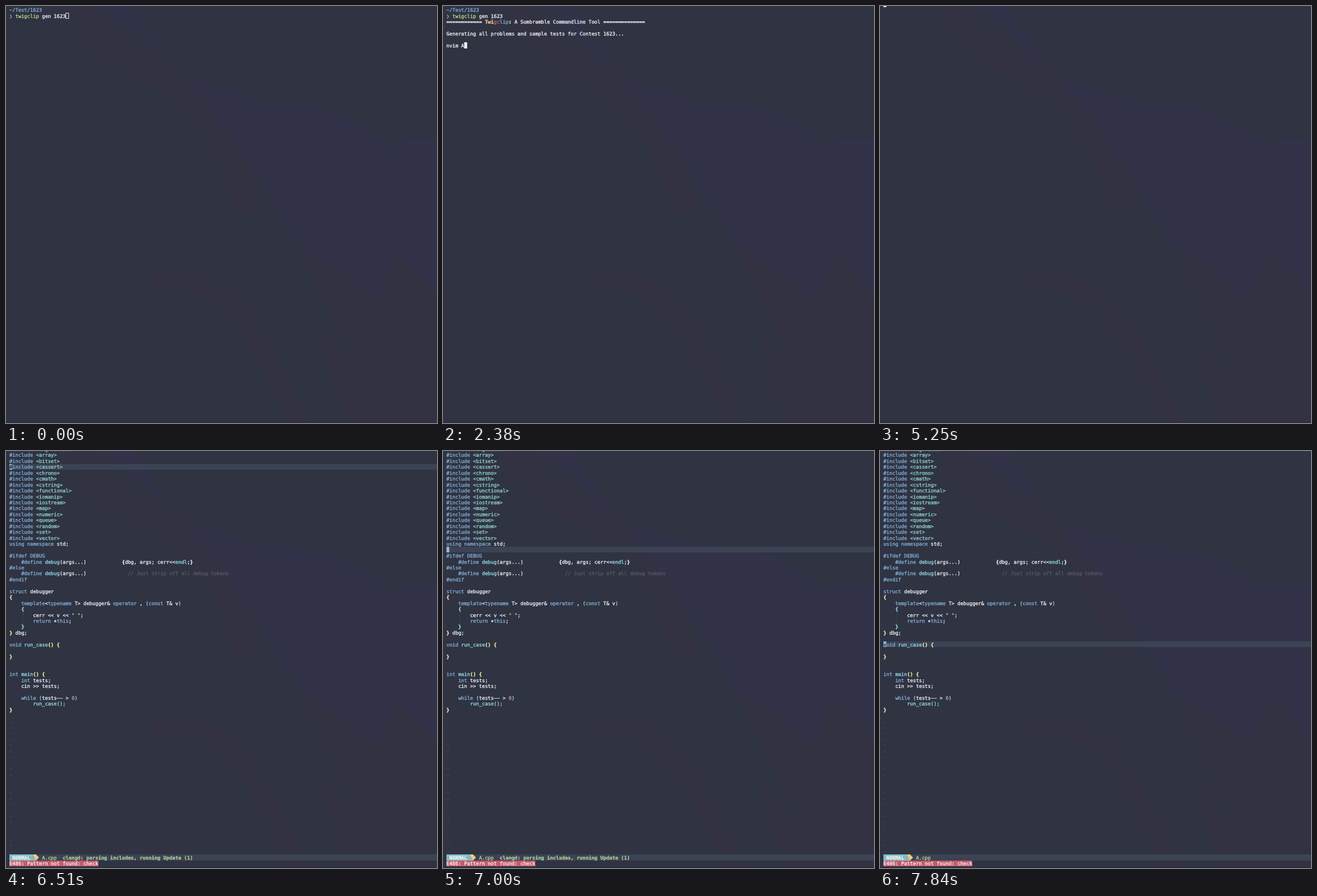
Write an HTML page with a canvas that moves like this. It is 760 by 736 pixels and loops after 8000 ms.

```html
<!DOCTYPE html>
<html lang="en">
<head>
<meta charset="utf-8">
<title>Terminal session</title>
<style>
html, body { margin: 0; width: 100%; height: 100%; overflow: hidden; background: #2f3342; }
canvas { display: block; }
</style>
</head>
<body>
<canvas id="stage" width="760" height="736"></canvas>
<script>
const ctx = document.getElementById('stage').getContext('2d');
const W = 760, H = 736, LOOP = 8000;
const X0 = 6, Y0 = 1.6, CW = 5.222, RH = 10.45;
const FONT = '8.67px "DejaVu Sans Mono", monospace';
const BASE = '#2f3342', BAR = '#3b4354', TEAL = '#82bcc1', GOLD = '#efcb84';

// Milliseconds at which each stage of the session begins.
const AT = {
  focus: 70, run: 280, type: 1050, done: 2800, prompt: 4830,
  blank: 5040, file: 5600, lsp: 6090, scroll: 6510, idle: 7700
};
const KEY_GAP = 168, REFRESH = 70;

// One letter per text colour; a capital letter means bold.
const INK = {
  w: '#eef1f6', b: '#83add4', c: '#93d8e6', t: '#92d4d0', y: '#f2eda2',
  g: '#b4d68c', s: '#a9c998', r: '#d0606e', p: '#c9829a', m: '#b990b6',
  o: GOLD, d: '#555b6a', f: '#414757', k: BASE
};

const x = col => X0 + col * CW;
const y = row => Y0 + row * RH;

function cell(row, col, n, color) {
  const top = Math.round(y(row));
  ctx.fillStyle = color;
  ctx.fillRect(x(col), top, n * CW, Math.round(y(row + 1)) - top);
}

const bar = row => cell(row, 0, (W - X0) / CW, BAR);

// The thin outline gives the glyphs the weight of terminal text.
function text(row, col, str, code) {
  const key = code.toLowerCase();
  ctx.font = (code !== key ? 'bold ' : '') + FONT;
  ctx.fillStyle = ctx.strokeStyle = INK[key];
  ctx.lineWidth = 0.35;
  for (const ch of str) {
    if (ch !== ' ') {
      ctx.fillText(ch, x(col), y(row) + 8.8);
      ctx.strokeText(ch, x(col), y(row) + 8.8);
    }
    col++;
  }
  return col;
}

// Spans are split by "¦" and start with their colour letter.
function line(row, spans, col = 0) {
  for (const s of spans.split('¦')) col = text(row, col, s.slice(1), s[0]);
}

function fill(color, path) {
  ctx.fillStyle = color;
  ctx.fill(new Path2D(path));
}

function ribbon(color, width, path) {
  ctx.strokeStyle = color;
  ctx.lineWidth = width;
  ctx.stroke(new Path2D(path));
}

function backdrop() {
  const warm = '#333243', violet = '#323348';
  ctx.fillStyle = BASE;
  ctx.fillRect(0, 0, W, H);
  ribbon(warm, 50, 'M125,-20 C160,115 300,100 355,190 S400,290 430,365');
  ribbon(warm, 34, 'M255,484 C400,480 420,540 522,745');
  fill(warm, 'M557,572 Q610,640 690,736 H603 Q560,640 557,572');
  fill(warm, 'M520,430 H760 V736 H692 Q590,600 520,430');
  fill(violet, 'M165,0 H225 Q270,60 305,130 Q360,130 440,166 Q600,165 680,250 L698,232 H760 V512 L690,435 L650,520 Q560,440 520,430 L460,335 Q360,145 165,0');
  ctx.fillStyle = '#2c2d3c';
  ctx.fillRect(0, H - 2, W, 2);
}

const HEADERS = 'algorithm array bitset cassert chrono cmath cstring functional iomanip iostream map numeric queue random set vector'.split(' ');
const CODE = [
  'busing namespace ¦wstd;',
  '',
  'b#ifdef DEBUG',
  'b    #define ¦cdebug¦w(args...)            ¦W{¦wdbg, args; cerr<<¦cendl¦w;¦W}',
  'b#else',
  'b    #define ¦cdebug¦w(args...)              ¦d// Just strip off all debug tokens',
  'b#endif',
  '',
  'bstruct ¦wdebugger',
  'Y{',
  'b    template¦w<¦btypename ¦wT> debugger& ¦boperator ¦w, ¦c(¦bconst ¦wT& v¦c)',
  'C    {',
  'f    ┊   ¦wcerr << v << ¦s" "¦w;',
  'f    ┊   ¦breturn ¦w∗¦bthis¦w;',
  'C    }',
  'Y}¦w dbg;',
  '',
  'bvoid ¦crun_case¦Y() {',
  '',
  'Y}',
  '',
  '',
  'bint ¦cmain¦Y() {',
  'b    int ¦wtests;',
  'w    cin >> tests;',
  '',
  'b    while ¦c(¦wtests–– > ¦m0¦c)',
  'c        run_case();',
  'Y}'
];
const CODE_ROW = HEADERS.length - 1;
const OPEN = CODE_ROW + CODE.indexOf('Y{');
const CLOSE = CODE_ROW + CODE.indexOf('Y}¦w dbg;');
const STOP = CODE_ROW + CODE.findIndex(s => s.startsWith('bvoid'));
const END = CODE_ROW + CODE.length;
const STATUS = 68;

const PROMPT = 'p❯ ';

function shell(t) {
  line(0, 'b~/Test/1623');
  line(1, PROMPT + '¦gtwigclip ¦wgen 1623');
  if (t < AT.focus) {
    ctx.lineWidth = 1;
    ctx.strokeStyle = INK.w;
    ctx.strokeRect(105.5, 12.5, 5, 9.5);
    return;
  }
  if (t < AT.run) return cell(1, 19, 1, INK.w);

  line(2, 'w============ ¦OTwi¦rgc¦blip¦W:¦w A Sumbramble Commandline Tool ==============');
  line(4, 'wGenerating all problems and sample tests for Contest 1623...');
  const keys = Math.max(0, Math.floor((t - AT.type) / KEY_GAP) + 1);
  const col = text(6, 0, 'nvim A'.slice(0, keys), 'w');
  if (t < AT.done) return cell(6, col, 1, INK.w);

  text(6, col, 'All problems and samples generated successfully', 'w');
  if (t < AT.prompt) return cell(7, 0, 1, INK.w);

  line(8, 'b~/Test/1623');
  line(9, PROMPT + '¦gnvim ¦wA');
  cell(9, 8, 1, INK.w);
}

// The held key moves two rows per screen refresh.
function cursorRow(t) {
  if (t < AT.scroll) return -1;
  return Math.min(STOP, 2 + 2 * Math.floor((t - AT.scroll) / REFRESH));
}

function statusBar(t) {
  bar(STATUS);
  cell(STATUS, 0, 8, TEAL);
  cell(STATUS, 8, 1, GOLD);
  const top = y(STATUS), base = y(STATUS + 1);
  fill(TEAL, `M${x(8)},${top} L${x(9)},${base} H${x(8)}`);
  fill(GOLD, `M${x(9)},${top} L${x(10)},${(top + base) / 2} L${x(9)},${base}`);
  text(STATUS, 1, 'NORMAL', 'W');
  text(STATUS, 11, 'A.cpp', 'g');
  if (t >= AT.lsp && t < AT.idle) {
    text(STATUS, 18, 'clangd: parsing includes, running Update (1)', 'S');
  }
  const error = 'E486: Pattern not found: check';
  cell(STATUS + 1, 0, error.length, '#c75a6b');
  text(STATUS + 1, 0, error, 'w');
}

function editor(t) {
  if (t < AT.file) return cell(-1, 0, 1, INK.w);
  const row = cursorRow(t);
  bar(row);
  HEADERS.forEach((h, i) => line(i - 1, `b#include ¦t<${h}>`));
  CODE.forEach((s, i) => s && line(i + CODE_ROW, s));
  for (let r = END + 1; r < STATUS; r++) text(r, 0, '~', 'f');

  const brace = row === OPEN || row === CLOSE;
  if (brace) {
    const mate = OPEN + CLOSE - row;
    cell(mate, 0, 1, '#4c586c');
    text(mate, 0, mate === OPEN ? '{' : '}', 'C');
  }
  const src = row < CODE_ROW ? 'b#' : CODE[row - CODE_ROW];
  cell(row, 0, 1, brace ? INK.c : '#8ab5d6');
  if (src) text(row, 0, src[1], 'k');
  statusBar(t);
}

const start = performance.now();

function frame() {
  const t = (performance.now() - start) % LOOP;
  backdrop();
  (t < AT.blank ? shell : editor)(t);
  requestAnimationFrame(frame);
}

ctx.textRendering = 'geometricPrecision';
ctx.lineJoin = 'round';
frame();
</script>
</body>
</html>
```
